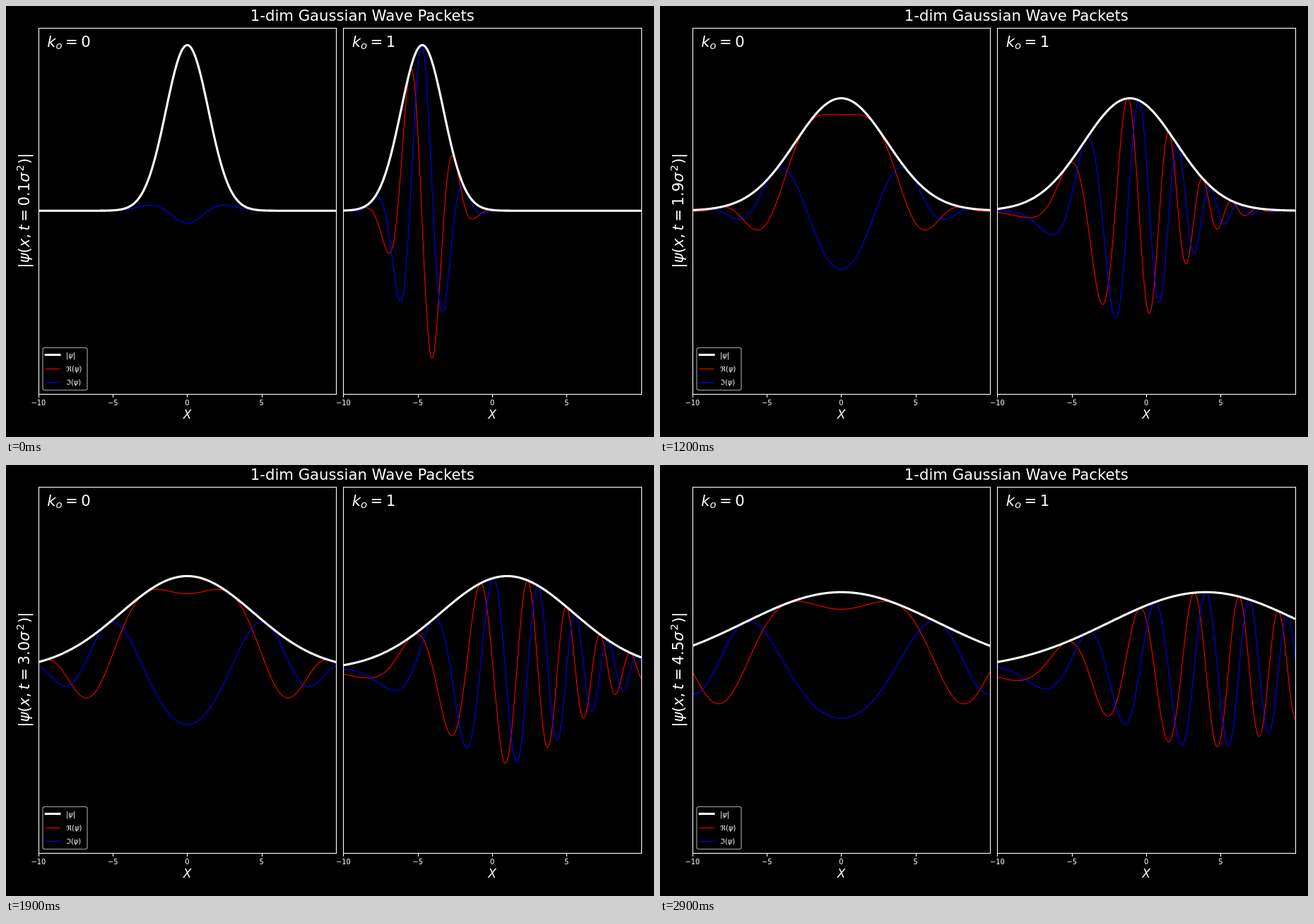
These frames come from a looping animation (917 px wide and 611 px high, 3 s). An HTML page with a canvas:

```html
<!DOCTYPE html>
<html lang="en">
<head>
<meta charset="utf-8">
<title>1-dim Gaussian Wave Packets</title>
<style>
  html, body { margin: 0; width: 100%; height: 100%; overflow: hidden; background: #000; }
  canvas { display: block; }
</style>
</head>
<body>
<canvas id="stage" width="917" height="611"></canvas>
<script>
const ctx = document.getElementById('stage').getContext('2d');
const STEP_MS = 100, STEPS = 30, DT = 0.15;
const TOP = 30.55, BOTTOM = 549.9, WIDTH = 421.2;
const MID = (TOP + BOTTOM) / 2;
const UNIT = WIDTH / 19.999;         // pixels per unit of x
const AMP = (BOTTOM - TOP) / 2.2;    // pixels per unit of psi
const BIG = 21.2, SMALL = 9.9;
const THICK = 3.1, THIN = 1.1;
const RED = '#f00', BLUE = '#00f', WHITE = '#fff';

const panels = [
  { left: 45.85, k: 0, x0: 0 },
  { left: 477.45, k: 1, x0: -5 }
];

// Centre of the pixel that a straight line is drawn on.
const snap = v => Math.round(v) + 0.5;

function setFont(size, italic) {
  ctx.font = `${italic ? 'italic ' : ''}${size}px "DejaVu Sans", sans-serif`;
}

function text(str, x, y, size, align = 'center', italic = false) {
  setFont(size, italic);
  ctx.textAlign = align;
  ctx.fillStyle = WHITE;
  ctx.fillText(str, x, y);
}

// A run is [string, italic, scale, rise, gap after], lengths in em.
function formula(runs, x, y, size, centred = false) {
  const widths = runs.map(([str, italic, scale = 1, , gap = 0]) => {
    setFont(size * scale, italic);
    return ctx.measureText(str).width + gap * size;
  });
  if (centred) x -= widths.reduce((a, b) => a + b, 0) / 2;
  runs.forEach(([str, italic, scale = 1, rise = 0], i) => {
    text(str, x, y - rise * size, size * scale, 'left', italic);
    x += widths[i];
  });
}

function line(x1, y1, x2, y2, color, width, cap = 'butt') {
  ctx.strokeStyle = color;
  ctx.lineWidth = width;
  ctx.lineCap = cap;
  ctx.beginPath();
  ctx.moveTo(x1, y1);
  ctx.lineTo(x2, y2);
  ctx.stroke();
}

// Spreading packet: modulus and phase at x, t.
function psi(x, t, { k, x0 }) {
  const u = x - x0 - 2 * k * t;
  const spread = 1 + t * t;
  return {
    mod: Math.pow(spread, -0.25) * Math.exp(-u * u / (4 * spread)),
    arg: k * (2 * x - x0 - t) + u * u * t / (4 * spread) - Math.atan(t) / 2
  };
}

function curve(panel, t, part, color, width) {
  ctx.strokeStyle = color;
  ctx.lineWidth = width;
  ctx.lineJoin = 'round';
  ctx.beginPath();
  for (let px = 0; px <= WIDTH + 0.5; px += 0.5) {
    const wave = psi(px / UNIT - 10, t, panel);
    ctx.lineTo(panel.left + px, MID - AMP * part(wave));
  }
  ctx.stroke();
}

function drawPanel(panel, t) {
  const { left, k } = panel;
  const x1 = snap(left), x2 = snap(left + WIDTH);
  const y1 = snap(TOP), y2 = snap(BOTTOM);
  ctx.save();
  ctx.beginPath();
  ctx.rect(x1 - 0.5, y1 - 0.5, x2 - x1, y2 - y1);
  ctx.clip();
  curve(panel, t, w => w.mod * Math.cos(w.arg), RED, THIN);
  curve(panel, t, w => w.mod * Math.sin(w.arg), BLUE, THIN);
  curve(panel, t, w => w.mod, WHITE, THICK);
  ctx.restore();

  ctx.strokeStyle = WHITE;
  ctx.lineWidth = 1.1;
  ctx.strokeRect(x1, y1, x2 - x1, y2 - y1);
  for (let x = -10; x <= 5; x += 5) {
    const px = left + (x + 10) * UNIT;
    line(snap(px), y2, snap(px), y2 + 4.5, WHITE, 1.1);
    text(x < 0 ? '\u2212' + -x : String(x), px, 566, SMALL);
  }
  text('X', left + WIDTH / 2, 585, 17, 'center', true);
  formula([['k', true], ['o', true, 0.7, -0.16, 0.21], ['=', false, 1, 0, 0.21], [String(k)]],
    left + 12.3, 57.5, BIG);
}

function drawLegend() {
  ctx.beginPath();
  ctx.roundRect(52, 484.5, 63, 60, 2.5);
  ctx.fillStyle = '#000';
  ctx.fill();
  ctx.strokeStyle = '#a8a8a8';
  ctx.lineWidth = 1.1;
  ctx.stroke();
  const entries = [
    [WHITE, THICK, '|', '|'],
    [RED, THIN, '\u211C(', ')'],
    [BLUE, THIN, '\u2111(', ')']
  ];
  entries.forEach(([color, width, open, close], i) => {
    const y = 494.3 + 19.25 * i;
    line(56.2, snap(y), 76, snap(y), color, width, 'square');
    formula([[open], ['\u03C8', true], [close]], 85, y + 4.2, SMALL);
  });
}

function drawTimeLabel(t) {
  ctx.save();
  ctx.translate(33, 290);
  ctx.rotate(-Math.PI / 2);
  formula([
    ['|'], ['\u03C8', true], ['('], ['x', true], [',', false, 1, 0, 0.21], ['t', true, 1, 0, 0.21],
    ['=', false, 1, 0, 0.21], [t.toFixed(1)], ['\u03C3', true, 1, 0, 0.09],
    ['2', false, 0.7, 0.36, 0.05], [')'], ['|']
  ], 0, 0, BIG, true);
  ctx.restore();
}

function draw(now) {
  const step = Math.floor(now / STEP_MS) % STEPS;
  const t = DT * (step + 1);
  ctx.fillStyle = '#000';
  ctx.fillRect(0, 0, 917, 611);
  panels.forEach(panel => drawPanel(panel, t));
  drawLegend();
  drawTimeLabel(t);
  text('1-dim Gaussian Wave Packets', 504.35, 21, BIG);
}

const start = performance.now();
function loop() {
  draw(performance.now() - start);
  requestAnimationFrame(loop);
}
loop();
</script>
</body>
</html>
```
